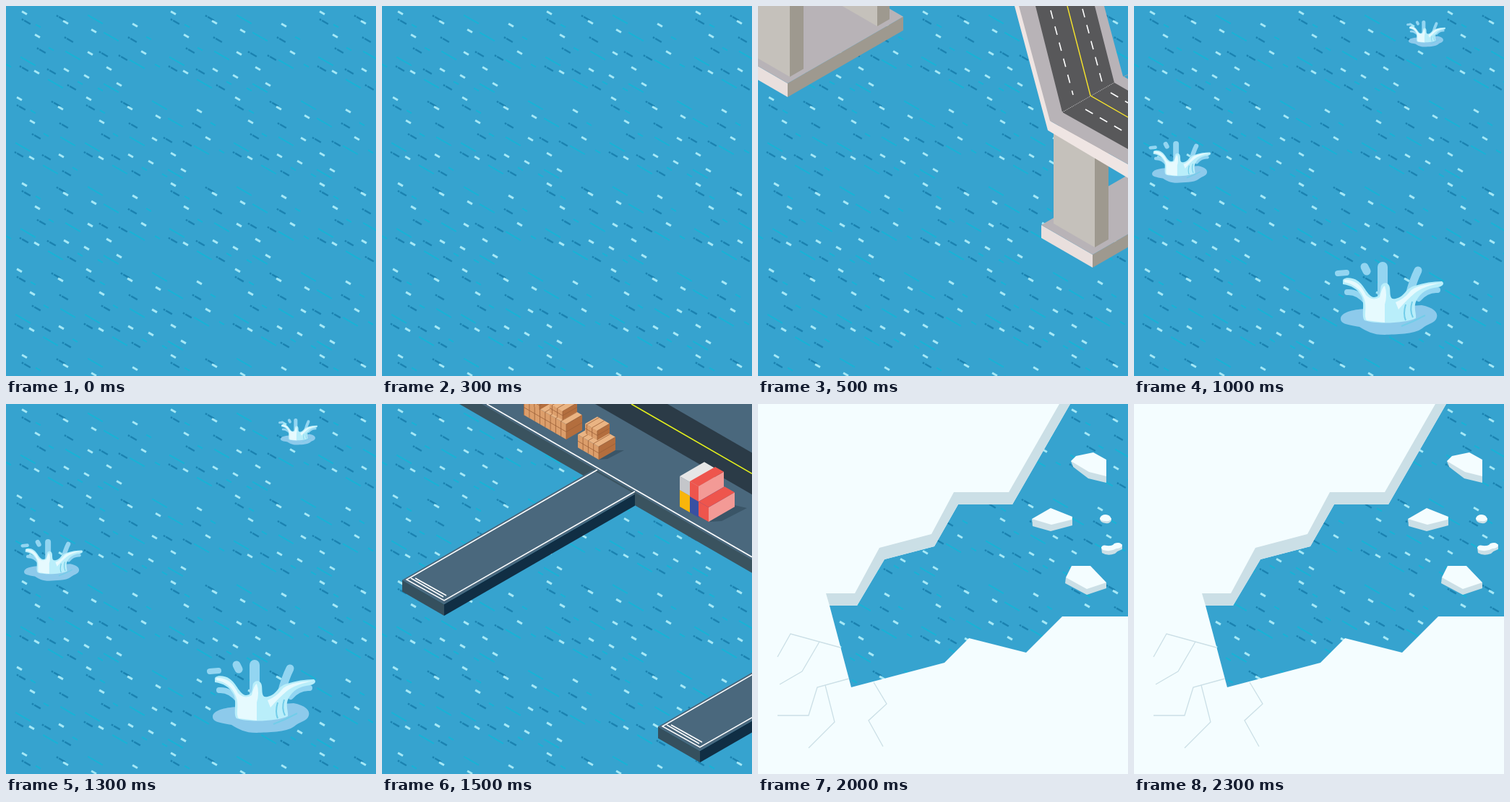
Animation of 512 by 512 pixels, one loop 2.5 s. Source, as an HTML page with a canvas:

```html
<!DOCTYPE html>
<html lang="en">
<head>
<meta charset="utf-8">
<title>Water scenes</title>
<style>
html, body { margin: 0; width: 100%; height: 100%; overflow: hidden; background: #36a3cf; }
canvas { display: block; width: 100vw; height: 100vh; }
</style>
</head>
<body>
<canvas id="stage" width="512" height="512"></canvas>
<script>
const ctx = document.getElementById('stage').getContext('2d');
const SCENE_MS = 500;
const SIZE = 512;
const SLOPE = 0.577; // isometric: tan 30°

const fill = (color, path, rule = 'nonzero') => {
  ctx.fillStyle = color;
  ctx.fill(new Path2D(path), rule);
};
const poly = (color, points) => fill(color, `M${points}Z`);
const line = (color, width, path, dash = []) => {
  ctx.strokeStyle = color;
  ctx.lineWidth = width;
  ctx.setLineDash(dash);
  ctx.stroke(new Path2D(path));
};
const at = (x, y, scale, draw) => {
  ctx.save();
  ctx.translate(x, y);
  ctx.scale(scale, scale);
  draw();
  ctx.restore();
};

// Isometric box: (x, y) is its lowest corner, a and b the spans to left and right.
function block(x, y, a, b, h, [left, right, top]) {
  const t = y - h, da = a * SLOPE, db = b * SLOPE;
  poly(left, [x, y, x - a, y - da, x - a, t - da, x, t]);
  poly(right, [x, y, x + b, y - db, x + b, t - db, x, t]);
  poly(top, [x, t, x - a, t - da, x - a + b, t - da - db, x + b, t - db]);
}

// Isometric band running down to the right between two points of the top edge.
const fall = x => (SIZE - x) * SLOPE;
const band = (color, x0, x1) =>
  poly(color, [x0, 0, x1, 0, SIZE, fall(x1), SIZE, fall(x0)]);
const bandLine = (color, x) => line(color, 1.6, `M${x} 0L${SIZE} ${fall(x)}`);

// Ripples repeat in 206 px tiles; every second row of tiles is offset.
const TILE = 206, ROW = 118.8;
const glints = [[25, 9], [82, 22], [178, 26], [121, 34], [43, 41], [116, 65],
                [190, 64], [42, 91], [83, 88], [142, 86], [111, 97], [156, 108]];
const shadows = [[29, 22], [77, 17], [88, 47], [176, 47], [50, 62],
                 [136, 67], [163, 72], [26, 87], [64, 91], [92, 113]];
const streaks = [[30, 76], [68, 107], [92, 68], [123, 18], [145, 42], [181, 80], [145, 113]];

function ripple(color, width, length, x, y) {
  const dx = length * 0.43, dy = dx * SLOPE;
  line(color, width, `M${x - dx} ${y - dy}L${x + dx} ${y + dy}`);
}

function tile(left, top, maxX = Infinity) {
  const each = (spots, draw) => spots.forEach(([x, y], i) => {
    if (x < maxX) draw(x + left + 0.5, y + top + 0.5, i);
  });
  each(streaks, (x, y) => ripple('#17b3d6', 2, 24, x, y));
  each(shadows, (x, y) => {
    ripple('#1b82b0', 2.4, 10, x, y);
    ripple('#1b82b0', 2.4, 2.6, x - 6.5, y - 3.7);
  });
  each(glints, (x, y, i) => {
    if (i % 2 === 0) ripple('#17b3d6', 2, 8, x + 19, y + 18);
    ripple('#a5e8f6', 3, 8, x, y);
  });
}

function water() {
  fill('#36a3cf', 'M0 0H512V512H0Z');
  for (let row = 0; row < 5; row++) {
    const odd = row % 2, top = row * ROW;
    for (let x = odd ? 89 : -TILE; x < SIZE; x += TILE) tile(x, top);
    if (odd) {
      tile(-7 - TILE, top);
      tile(-7, top, 105);
    }
  }
}

function bridge() {
  const deck = '#b8b3b7', white = '#fff';
  const concrete = ['#c5c1bb', '#9e998f', '#c5c1bb'];
  const base = ['#e9dfdd', '#9e998f', deck];
  block(41, 126, 140, 160, 19, base);
  block(165, 28, 48, 17, 80, concrete);
  block(44, 98, 60, 19, 150, concrete);
  block(463, 362, 71, 120, 18, base);
  block(466, 334, 57, 19, 130, concrete);

  poly('#efe5e3', '355 0 363 0 406 160 512 219 512 238 401 172');
  poly(deck, '361 0 479 0 505 97 512 101 512 219 404 159');
  poly('#58585a', '384 0 466 0 493 106 512 117 512 198 421 147');
  line('#9aa0a8', 1, 'M505 98L512 95');
  line('#e5e5e5', 1, 'M421 147L493 106', [1, 1.5]);
  line('#f7e52b', 1.4, 'M428 0L460 124L512 154');
  line(white, 1.6, 'M405 6L436 123M449 4L476 105M453 143L512 177M488 120L512 134', [12, 11]);
}

function splash() {
  const back = '#93d5f1';
  fill('#8dcaeb', 'M286 433C286 424 302 420 320 419L398 414C414 417 421 424 419 431C417 439 405 440 399 446C387 455 362 454 347 455C330 455 322 450 312 444C296 441 286 440 286 433Z');
  ctx.lineCap = 'round';
  line(back, 14, 'M344 361V405');
  line(back, 11, 'M393 366Q386 380 381 400M319 361L322 367');
  line(back, 8, 'M282 370L294 369M295 396Q310 395 322 410M420 393Q405 392 394 405');
  ctx.lineCap = 'butt';
  fill('#b9eefa', 'M289 381C288 375 302 375 309 380C319 386 323 402 332 403C343 402 340 393 342 387C345 381 353 382 354 390C355 398 353 407 362 405C376 402 374 391 389 387C401 383 414 381 426 381C430 383 428 388 421 389C404 391 397 397 391 407C386 416 391 426 390 432C376 439 336 441 319 435C314 429 320 413 315 402C309 391 301 387 289 385Z');
  fill('#e6fafe', 'M291 379C305 378 315 386 321 400Q330 409 340 403Q343 389 347 387Q351 400 347 413V438L322 435C317 429 324 415 317 402Q310 386 291 382ZM362 410Q374 405 382 395T426 383Q400 388 389 397T366 420Z');
  line('#72cde9', 2, 'M376 413Q372 426 376 435M385 409Q381 421 386 431M370 443L387 436L403 428');
}

function splashes() {
  splash();
  at(-138.3, -15.1, 0.571, splash);
  at(277, -107.4, 0.36, splash);
}

function crate(x, y, a, b, h) {
  block(x, y, a, b, h, ['#dc9e6b', '#b36e3e', '#eab483']);
  const mid = y - h / 2;
  let seams = `M${x - a} ${mid - a * SLOPE}L${x} ${mid}L${x + b} ${mid - b * SLOPE}`;
  for (let s = 0; s < a; s += 7.3) {
    seams += `M${x - s} ${y - s * SLOPE}v${-h}l${b} ${-b * SLOPE}`;
  }
  line('#9c6038', 0.8, seams);
}

function pier() {
  block(86, 293, 58, 264, 16, ['#35505e', '#102e44', '#4a687d']);
  line('#fff', 1.5, 'M298 91L34 243L86 272L350 121M40 241L85 267M46 241L89 265');
}

function harbour() {
  const red = ['#ee554d', '#f39a96', '#ee554d'];
  const plain = color => [color, color, color];
  at(354, 203, 1, pier);
  band('#3a535f', 107, 140);
  band('#4a687d', 138, SIZE);
  band('#2b3b47', 295, 395);
  bandLine('#e6f21b', 345);
  pier();
  bandLine('#fff', 145);

  poly('#3a5567', '300 77 323 64 335 64 312 76');
  crate(255, 49, 59, 22, 21);
  crate(218, 8, 20, 21, 12);
  crate(250, 22, 18, 20, 12);
  crate(300, 77, 29, 23, 18);
  crate(298, 50, 17, 17, 13);

  poly('#3a5567', '452 163 488 140 505 144 470 162');
  block(426, 150, 14, 34, 23, plain('#f9b50b'));
  block(426, 127, 14, 34, 19, ['#c4c6ca', '#c4c6ca', '#e6e6e6']);
  block(438, 157, 12, 35, 23, plain('#3950a2'));
  block(438, 135, 12, 35, 21, red);
  block(452, 163, 14, 36, 20, red);
}

function ice() {
  const snow = '#f4fdff', edge = '#cbdfe6';
  const shore = '432 0 352 139 277 139 244 197 175 215 137 279 99 279';
  fill(snow, `M0 0H512V512H0ZM${shore} 129 392 258 358 292 324 371 344 421 294 512 294 512 0Z`, 'evenodd');
  poly(edge, `94 262 134 262 168 199 240 180 271 122 347 122 417 0 ${shore}`);
  line(edge, 1.3, 'M27 350L45 318L114 337M85 329L61 370L30 388M27 431H70L82 392L126 380M93 389L106 440L70 476M160 385L178 415L153 438L173 474');

  const floe = (side, top) => {
    poly(edge, side);
    poly(snow, top);
  };
  floe('433 79 482 77 482 109 457 103 436 87', '433 79 440 72 464 67 482 77 482 100 458 94');
  floe('379 159 435 156 435 168 405 176 380 169', '379 159 405 144 435 156 434 160 406 167');
  floe('426 240 482 247 482 255 455 264 425 248', '426 240 434 224 460 224 482 247 455 256');
  floe('473 158H489V161Q487 166 481 165Q473 164 473 158', '473 158Q475 153 481 153T489 159Q486 163 481 162Q473 162 473 158');
  floe('475 198L504 194V201Q498 203 494 207Q484 211 476 206', '475 199Q476 194 483 196Q490 197 493 193Q502 190 504 196Q502 200 496 200Q488 205 477 202');
}

const openWater = () => {};
const scenes = [openWater, bridge, splashes, harbour, ice];
let shown = -1;

function frame() {
  const index = Math.floor(performance.now() / SCENE_MS) % scenes.length;
  if (index !== shown) {
    shown = index;
    water();
    scenes[index]();
  }
  requestAnimationFrame(frame);
}
frame();
</script>
</body>
</html>
```
